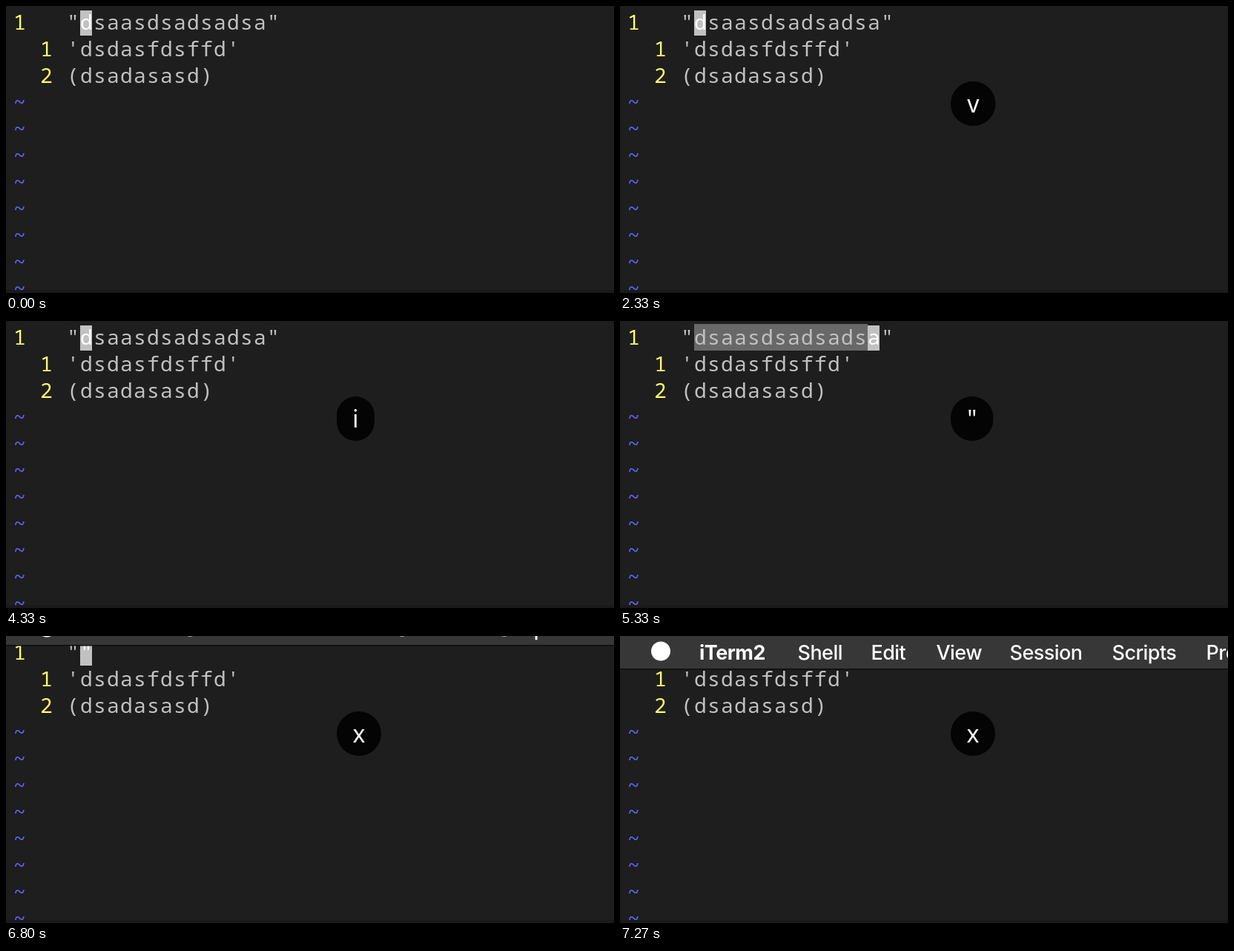
An HTML page that plays this animation: 820x388 px, repeating every 7670 ms.

```html
<!DOCTYPE html>
<html lang="en">
<head>
<meta charset="utf-8">
<title>Deleting inside quotes</title>
<style>
  html, body { margin: 0; width: 100%; height: 100%; overflow: hidden; background: #1e1e1e; }
  svg { display: block; width: 820px; height: 388px; }

  .term { font: 28px "Noto Sans Mono", monospace; letter-spacing: 1.2px; fill: #c1c1c1; }
  .number { fill: #fffc67; }
  .tilde { fill: #6064f8; }
  .cursor { fill: #c1c1c1; }
  .selection { fill: #686868; }
  .under { fill: #fff; }

  .key rect { fill: #040404; }
  .key text { font: 32px "Noto Sans", sans-serif; fill: #fff; text-anchor: middle; }

  .menu text { font: 500 27px Inter, sans-serif; letter-spacing: -.55px; fill: #fff; }
  .menu .app { font-weight: 700; }

  /* One loop is 7670 ms; every change is a hard step. */
  .normal, .visual, .deleted, .key, .menu { animation: 7670ms step-end infinite; }
  .normal { animation-name: normal; }
  .visual { animation-name: visual; }
  .deleted { animation-name: deleted; }
  .v { animation-name: key-v; }
  .i { animation-name: key-i; }
  .quote { animation-name: key-quote; }
  .x { animation-name: key-x; }
  .menu { animation-name: menu; }

  @keyframes normal { 0% { opacity: 1 } 60.88%, 100% { opacity: 0 } }
  @keyframes visual { 0% { opacity: 0 } 60.88% { opacity: 1 } 78.22%, 100% { opacity: 0 } }
  @keyframes deleted { 0% { opacity: 0 } 78.22%, 100% { opacity: 1 } }

  /* A key moves up when the next one is pressed and fades two seconds after its own press. */
  @keyframes key-v {
    0% { opacity: 0; transform: none }
    12.12% { opacity: 1; transform: none }
    36.5% { opacity: 1; transform: translateY(-80px) }
    38.2% { opacity: .75; transform: translateY(-80px) }
    39.11% { opacity: .35; transform: translateY(-80px) }
    40.02%, 100% { opacity: 0; transform: translateY(-80px) }
  }
  @keyframes key-i {
    0% { opacity: 0; transform: none }
    36.5% { opacity: 1; transform: none }
    59.97% { opacity: 1; transform: translateY(-80px) }
    62.58% { opacity: .85; transform: translateY(-80px) }
    63.49% { opacity: .55; transform: translateY(-80px) }
    64.27% { opacity: .22; transform: translateY(-80px) }
    65.18%, 100% { opacity: 0; transform: translateY(-80px) }
  }
  @keyframes key-quote {
    0% { opacity: 0; transform: none }
    59.97% { opacity: 1; transform: none }
    78.22% { opacity: 1; transform: translateY(-80px) }
    86.04% { opacity: .85; transform: translateY(-80px) }
    86.96% { opacity: .55; transform: translateY(-80px) }
    87.74% { opacity: .22; transform: translateY(-80px) }
    88.65%, 100% { opacity: 0; transform: translateY(-80px) }
  }
  @keyframes key-x { 0% { opacity: 0 } 78.22%, 100% { opacity: 1 } }

  @keyframes menu {
    0% { transform: translateY(-50px) }
    87.74% { transform: translateY(-42px) }
    88.65% { transform: translateY(-32px) }
    89.56% { transform: translateY(-11px) }
    90.35%, 100% { transform: none }
  }
</style>
</head>
<body>
<svg viewBox="0 0 820 388">
  <rect width="820" height="388" fill="#1e1e1e"/>
  <rect y="384" width="820" height="4" fill="#1a1a1a"/>

  <g class="term">
    <g class="number">
      <text x="10" y="32">1</text>
      <text x="46" y="68">1</text>
      <text x="46" y="104">2</text>
    </g>
    <text x="82" y="68">'dsdasfdsffd'</text>
    <text x="82" y="104">(dsadasasd)</text>
    <g class="tilde">
      <text x="10" y="140">~</text>
      <text x="10" y="176">~</text>
      <text x="10" y="212">~</text>
      <text x="10" y="248">~</text>
      <text x="10" y="284">~</text>
      <text x="10" y="320">~</text>
      <text x="10" y="356">~</text>
      <text x="10" y="392">~</text>
    </g>

    <text x="82" y="32">"</text>
    <g class="normal">
      <rect class="cursor" x="100" y="6" width="16" height="34"/>
      <text class="under" x="100" y="32">d</text>
      <text x="118" y="32">saasdsadsadsa"</text>
    </g>
    <g class="visual">
      <rect class="selection" x="100" y="4" width="234" height="36"/>
      <rect class="cursor" x="334" y="6" width="16" height="34"/>
      <text x="100" y="32">dsaasdsadsads</text>
      <text class="under" x="334" y="32">a</text>
      <text x="352" y="32">"</text>
    </g>
    <g class="deleted">
      <rect class="cursor" x="100" y="6" width="16" height="34"/>
      <text class="under" x="100" y="32">"</text>
    </g>
  </g>

  <g class="key v">
    <rect x="446" y="102" width="60.5" height="60" rx="30"/>
    <text x="476.5" y="144">v</text>
  </g>
  <g class="key i">
    <rect x="446" y="102" width="51" height="60" rx="25.5"/>
    <text x="471.5" y="144">i</text>
  </g>
  <g class="key quote">
    <rect x="446" y="102" width="57.5" height="60" rx="28.7"/>
    <text x="474.7" y="144">"</text>
  </g>
  <g class="key x">
    <rect x="446" y="102" width="60" height="60" rx="30"/>
    <text x="476" y="144">x</text>
  </g>

  <g class="menu">
    <rect width="820" height="44" fill="#373737"/>
    <rect y="44" width="820" height="1.5" fill="#0e0e0e"/>
    <circle cx="55" cy="20.5" r="13" fill="#fff"/>
    <text class="app" x="107" y="32">iTerm2</text>
    <text x="239.5" y="32">Shell</text>
    <text x="338.5" y="32">Edit</text>
    <text x="426.5" y="32">View</text>
    <text x="525.5" y="32">Session</text>
    <text x="663.5" y="32">Scripts</text>
    <text x="790.5" y="32">Profiles</text>
  </g>
</svg>
</body>
</html>
```
